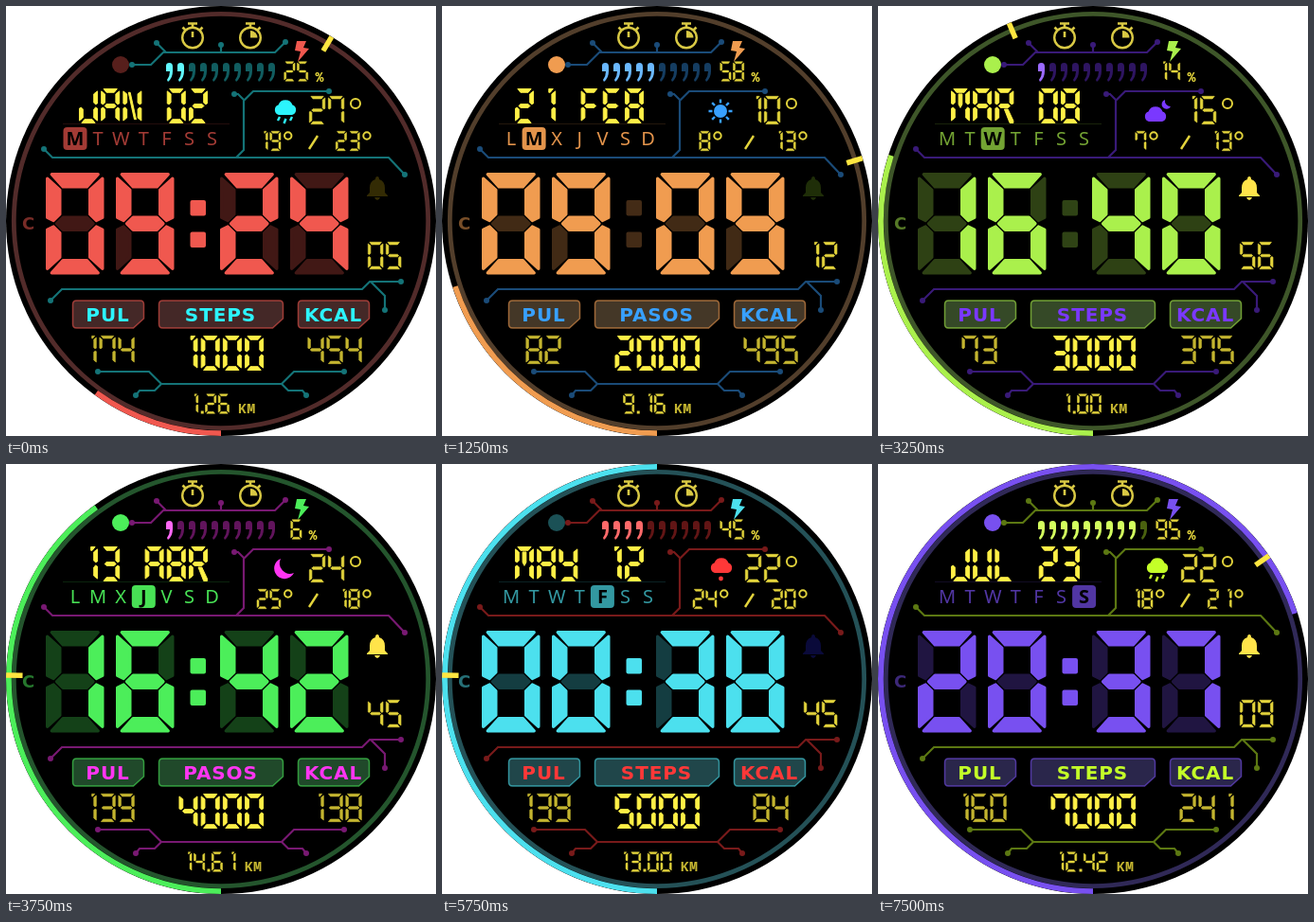
Animation, 454 px wide and 454 px high, one loop 8000 ms. Source, as an HTML page:

```html
<!DOCTYPE html>
<html lang="en">
<head>
<meta charset="utf-8">
<title>Digital watch face</title>
<style>
  html, body { margin: 0; width: 100%; height: 100%; overflow: hidden; background: #fff; }
  svg { display: block; width: 454px; height: 454px; }
  text { text-anchor: middle; }
  .label { font: 700 20px "DejaVu Sans", sans-serif; letter-spacing: .9px; }
  .scale { font: 700 18px "DejaVu Sans", sans-serif; }
  .day { font: 500 20px "Noto Sans", sans-serif; }
  .today { font-weight: 700; }
  .unit { font: 700 15px "Noto Sans Mono", monospace; }
</style>
</head>
<body>
<svg id="face" viewBox="0 0 454 454"></svg>
<script>
const STEP = 1250, LOOP = 8000;
const BRIGHT = '#fff047', SOFT = '#e3d43c', DIM = '#c4b530', BELL = '#ffe44a';

const states = [
  { main: '#f0584f', accent: '#2cf4fc', link: 0, day: 0, date: 'JAN 02', low: '19', high: '23', temp: '27', sky: 'rain',
    battery: 25, time: '0924', colon: 1, bell: '#332b04', sec: '05', pulse: '174', kcal: '454', km: '1.26' },
  { main: '#f09c50', accent: '#38a0ff', link: 1, day: 1, date: '21 FEB', low: '8', high: '13', temp: '10', sky: 'sun',
    battery: 58, time: '0909', colon: 0, bell: '#1f2e08', sec: '12', pulse: '82', kcal: '495', km: '9.16' },
  { main: '#aaf04c', accent: '#7a38ff', link: 1, day: 2, date: 'MAR 08', low: '7', high: '13', temp: '15', sky: 'night',
    battery: 14, time: '1640', colon: 0, bell: BELL, sec: '56', pulse: '73', kcal: '375', km: '1.00' },
  { main: '#4cee5a', accent: '#ff35f2', link: 1, day: 3, date: '13 ABR', low: '25', high: '18', temp: '24', sky: 'moon',
    battery: 6, time: '1642', colon: 1, bell: BELL, sec: '45', pulse: '139', kcal: '138', km: '14.61' },
  { main: '#4ce0ee', accent: '#ff3838', link: 0, day: 4, date: 'MAY 12', low: '24', high: '20', temp: '22', sky: 'snow',
    battery: 45, time: '0038', colon: 1, bell: '#0a0a3a', sec: '45', pulse: '139', kcal: '84', km: '13.00' },
  { main: '#4c92f0', accent: '#ff9236', link: 1, day: 5, date: '17 JUN', low: '15', high: '22', temp: '19', sky: 'rain',
    battery: 60, time: '0356', colon: 0, bell: BELL, sec: '00', pulse: '148', kcal: '86', km: '7.87' },
  { main: '#7850f0', accent: '#c4ff28', link: 1, day: 6, date: 'JUL 23', low: '18', high: '21', temp: '22', sky: 'rain',
    battery: 95, time: '2037', colon: 1, bell: BELL, sec: '09', pulse: '160', kcal: '241', km: '12.42' },
];

// Segments: a top, b/c right, d bottom, e/f left, g middle, h flag, i inner bar, j diagonal, k leg
const glyphs = {
  0: 'abcdef', 1: 'bch', 2: 'abdeg', 3: 'abcdg', 4: 'bcfg', 5: 'acdfg', 6: 'acdefg', 7: 'abcf',
  8: 'abcdefg', 9: 'abcdfg', A: 'abcefg', B: 'abcdefg', E: 'adefg', F: 'aefg', J: 'bcde', L: 'def',
  M: 'abcefi', N: 'bcefj', R: 'abefgk', U: 'bcdef', Y: 'bcdfg', ' ': '',
};

function segmentPath(name, w, h, t, edge, gap) {
  const m = h / 2, s = t / 2;
  const top = [[edge, 0], [w - edge, 0], [w - t - gap, t], [t + gap, t]];
  const left = [[0, edge], [t, t + gap], [t, m - s - gap], [s, m - gap], [0, m - gap - t / 4]];
  const flipX = pts => pts.map(([x, y]) => [w - x, y]);
  const flipY = pts => pts.map(([x, y]) => [x, h - y]);
  const shapes = {
    a: top, d: flipY(top), f: left, e: flipY(left), b: flipX(left), c: flipX(flipY(left)),
    g: [[s + gap, m], [t + gap, m - s], [w - t - gap, m - s], [w - s - gap, m], [w - t - gap, m + s], [t + gap, m + s]],
    h: [[w - 1.8 * t, 0], [w - edge, 0], [w - t - gap, t], [w - 1.8 * t, t]],
    i: [[w / 2 - s, t + gap], [w / 2 + s, t + gap], [w / 2 + s, m - gap], [w / 2, m + s], [w / 2 - s, m - gap]],
    j: [[t + gap, t], [t + gap + s, t], [w - t - gap, h - t], [w - t - gap - s, h - t]],
    k: [[w / 2, m + s + gap], [w / 2 + t, m + s + gap], [w, h - edge], [w, h], [w - t, h]],
  };
  return 'M' + shapes[name].map(p => p.map(n => n.toFixed(1)).join()).join('L') + 'z';
}

// The outline rounds the corners, so the segments are inset by r
function glyph(segs, x, y, w, h, t, edge, gap, color) {
  const r = t * .1;
  const d = [...segs].map(s => segmentPath(s, w - 2 * r, h - 2 * r, t - 2 * r, t * edge, t * gap)).join('');
  return `<path transform="translate(${x + r} ${y + r})" fill="${color}" stroke="${color}" stroke-width="${2 * r}" stroke-linejoin="round" d="${d}"/>`;
}

const lcd = (str, x, y, pitch, h, t, color) => [...String(str)].map((ch, i) =>
  glyph(glyphs[ch], x + i * pitch, y, pitch * .86, h, t, .5, .33, color)).join('');

const small = (str, x, y) => lcd(str, x, y, 13.7, 21, 2.5, SOFT);
const medium = (str, center, y, color = DIM) => lcd(str, center + 1 - str.length * 10, y, 20, 30, 3.3, color);
const large = (str, x, y) => lcd(str, x, y, 23.2, 37, 4.8, BRIGHT);
const line = (d, color, width = 2) => `<path d="${d}" fill="none" stroke="${color}" stroke-width="${width}"/>`;
const dot = (x, y, r, color) => `<circle cx="${x}" cy="${y}" r="${r}" fill="${color}"/>`;
const degree = (x, y, r) => `<circle cx="${x}" cy="${y}" r="${r}" fill="none" stroke="${SOFT}" stroke-width="2"/>`;
const text = (str, x, y, cls, color) => `<text class="${cls}" x="${x}" y="${y}" fill="${color}">${str}</text>`;
const muted = (color, share) => `color-mix(in srgb, ${color} ${share}%, #141a1c)`;

function bezel({ main, sec }, steps) {
  const ring = (r, width, color, extra = '') =>
    `<circle cx="227" cy="227" r="${r}" fill="none" style="stroke:${color}" stroke-width="${width}" ${extra}/>`;
  return ring(218.7, 4.8, muted(main, 28)) +
    ring(224.1, 5.8, main, `pathLength="360" stroke-dasharray="${steps * .036} 360" transform="rotate(90 227 227)"`) +
    `<path d="M227 0v17.5" stroke="#ffe640" stroke-width="5.5" transform="rotate(${sec * 6 + 1} 227 227)"/>`;
}

function circuit(color) {
  const ends = '133 62,159 39,227 41,295 38,241 93,341 90,40 151,421 178,47 311,417 291,400 321,97 386,357 386,137 411,317 411';
  return `<g opacity=".47">${line(`M133 62H153L166 49H284L295 38M159 39L169 49M227 41V49
    M241 93H245L251 99M341 90H261L251 100V152L243 160M40 151L49 160H404L421 178
    M47 311L59 299H376L384 291H417M385 291L400 306V321
    M97 386H151L164 399H291L304 386H357M137 411L141 406H157L164 399M317 411L313 406H298L291 399`, color, 2.2)}` +
    ends.split(',').map(p => dot(...p.split(' '), 3, color)).join('') + '</g>';
}

function clocks() {
  const c = '#d9c944';
  return line('M192 18.5H202M197 19V23M186.5 22.5L190 26M207.5 22.5L204 26M197 33V27', c, 2.6) +
    line('M253 18.5H263M258 19V23M268.5 22.5L265 26', c, 2.6) +
    [197, 258].map(x => `<circle cx="${x}" cy="33.5" r="10.8" fill="none" stroke="${c}" stroke-width="2.4"/>`).join('') +
    `<path d="M258 33.5V26A7.5 7.5 0 0 1 265.5 33.5z" fill="${c}"/>`;
}

function battery({ main, accent, battery: level }) {
  const lit = Math.max(1, Math.floor(level / 10)), n = String(level).length;
  const x = 315 - (n * 14 + 15) / 2;
  let out = `<path d="M307 37H317L314 44L320 45L308 59L311 48L305 47z" fill="${main}"/>`;
  for (let i = 0; i < 10; i++)
    out += `<path transform="translate(${169 + i * 12} 60)" d="M0 3Q0 0 3.5 0Q7 0 7 4V9Q7 16 2 20L1 18Q4 14 4 9H0z"
      style="fill:color-mix(in srgb, ${accent} ${i < lit ? '75%, white' : '38%, black'})"/>`;
  return out + small(level, x, 58.5) + text('%', x + n * 14 + 9.5, 79.5, 'unit', SOFT);
}

function sky(kind, color) {
  const cloud = 'M288 115A5.5 5.5 0 0 1 287.5 104.5A8 8 0 0 1 302.5 104.5A5.5 5.5 0 0 1 302 115z';
  const fill = (d, extra = '') => `<path d="${d}" fill="${color}" ${extra}/>`;
  if (kind === 'sun') {
    let rays = '';
    for (let a = 0; a < 360; a += 45) rays += `<path d="M294 98.5v4" stroke="${color}" stroke-width="2.4" transform="rotate(${a} 294 111)"/>`;
    return dot(294, 111, 7, color) + rays;
  }
  if (kind === 'moon') return fill('M290 100A11 11 0 1 0 304 115A11 11 0 0 1 290 100z');
  if (kind === 'night') return fill(cloud, 'transform="translate(-2 7)"') + fill('M303 99A5 5 0 1 0 309 106A6 6 0 0 1 303 99z');
  if (kind === 'snow') return fill(cloud) + dot(294.5, 121, 2.4, color);
  return fill(cloud) + line('M289 117L287 121M295.5 119L293.5 124M302 117L300 121', color, 2.4);
}

function weather({ low, high, temp, sky: kind, accent }) {
  const x = 285 - (low.length + 1) * 6.75;
  return sky(kind, accent) + medium(temp, 339, 95, SOFT) + degree(369, 103, 5) +
    small(low, x, 132) + degree(x + low.length * 13.5 + 6, 137, 3.7) +
    line('M320 151L329 137', SOFT, 2.4) +
    small(high, 348, 132) + degree(381, 137, 3.7);
}

function weekdays({ main, day }, spanish) {
  const letters = [...(spanish ? 'LMXJVSD' : 'MTWTFSS')];
  return `<g opacity="${spanish ? .95 : .68}">` + letters.map((ch, i) => {
    const x = 73 + i * 24.1;
    if (i !== day) return text(ch, x, 146.8, 'day', main);
    return `<rect x="${x - 12.5}" y="128" width="25" height="24" rx="4" fill="${main}"/>` + text(ch, x, 146.8, 'day today', '#000');
  }).join('') + `</g><path d="M60 124.5H236" stroke="${main}" opacity=".15"/>`;
}

function bigTime({ time, colon, main }) {
  const digit = (ch, x) => {
    const draw = segs => glyph(segs, x, 176, 61.5, 107.5, 16.5, .28, .2, main);
    const lit = glyphs[ch].replace('h', '').replace(ch === '7' ? 'f' : '', '');
    const ghost = [...'abcdefg'].filter(s => !lit.includes(s));
    return `<g opacity=".27">${draw(ghost)}</g>` + draw(lit);
  };
  return [42, 116, 226, 300].map((x, i) => digit(time[i], x)).join('') +
    [205, 238.5].map(y => `<rect x="194.5" y="${y}" width="16.5" height="16.5" rx="2" fill="${main}" opacity="${colon ? 1 : .28}"/>`).join('');
}

function button(label, x, w, { main, accent }) {
  const d = `M${x + 4} 311H${x + w - 4}q4 0 4 4V330L${x + w - 11} 340H${x + 4}q-4 0 -4 -4V315q0 -4 4 -4z`;
  return `<path d="${d}" style="fill:${muted(main, 22)}" stroke="${main}" stroke-opacity=".6" stroke-width="1.5"/>` +
    text(label, x + w / 2 - .5, 332.5, 'label', accent);
}

function distance(km) {
  const [whole, part] = km.split('.'), start = 227.5 - (whole.length * 13.5 + 59) / 2;
  const x = start + whole.length * 13.5;
  return small(whole, start, 409.5) + `<rect x="${x + 1}" y="427.5" width="3" height="3" fill="${SOFT}"/>` +
    small(part, x + 5.5, 409.5) + text('KM', x + 49.5, 430, 'unit', DIM);
}

const bell = color => `<path fill="${color}" d="M390 183Q390 180 392 180T394 183Q400 185 400 192V197L403 200V201H381V200
  L384 197V192Q384 185 390 183zM389 202H395Q394 205 392 205T389 202z"/>`;

function render(index) {
  const s = states[index], spanish = index % 2 === 1, steps = (index + 1) * 1000;
  return '<clipPath id="disc"><circle cx="227" cy="227" r="227"/></clipPath>' +
    '<g clip-path="url(#disc)"><rect width="454" height="454"/>' +
    bezel(s, steps) + circuit(s.accent) + clocks() +
    `<g opacity="${s.link ? 1 : .36}">${dot(121, 62, 9, s.main)}</g>` +
    battery(s) + large(s.date, 77, 87) + weekdays(s, spanish) + weather(s) +
    `<g opacity=".5">${text('C', 23.5, 235.5, 'scale', s.main)}</g>` +
    bigTime(s) + bell(s.bell) + lcd(s.sec, 382, 249, 19, 29, 3.2, SOFT) +
    button('PUL', 70.5, 75, s) + button(spanish ? 'PASOS' : 'STEPS', 161.5, 131, s) + button('KCAL', 308.5, 75, s) +
    medium(s.pulse, 107.5, 348) + large(steps, 182.5, 348) + medium(s.kcal, 347.5, 348) +
    distance(s.km) + '</g>';
}

const face = document.getElementById('face');
const start = performance.now();
let shown = -1;

function tick() {
  const index = Math.floor(((performance.now() - start) % LOOP) / STEP);
  if (index !== shown) face.innerHTML = render(shown = index);
  requestAnimationFrame(tick);
}
tick();
</script>
</body>
</html>
```
